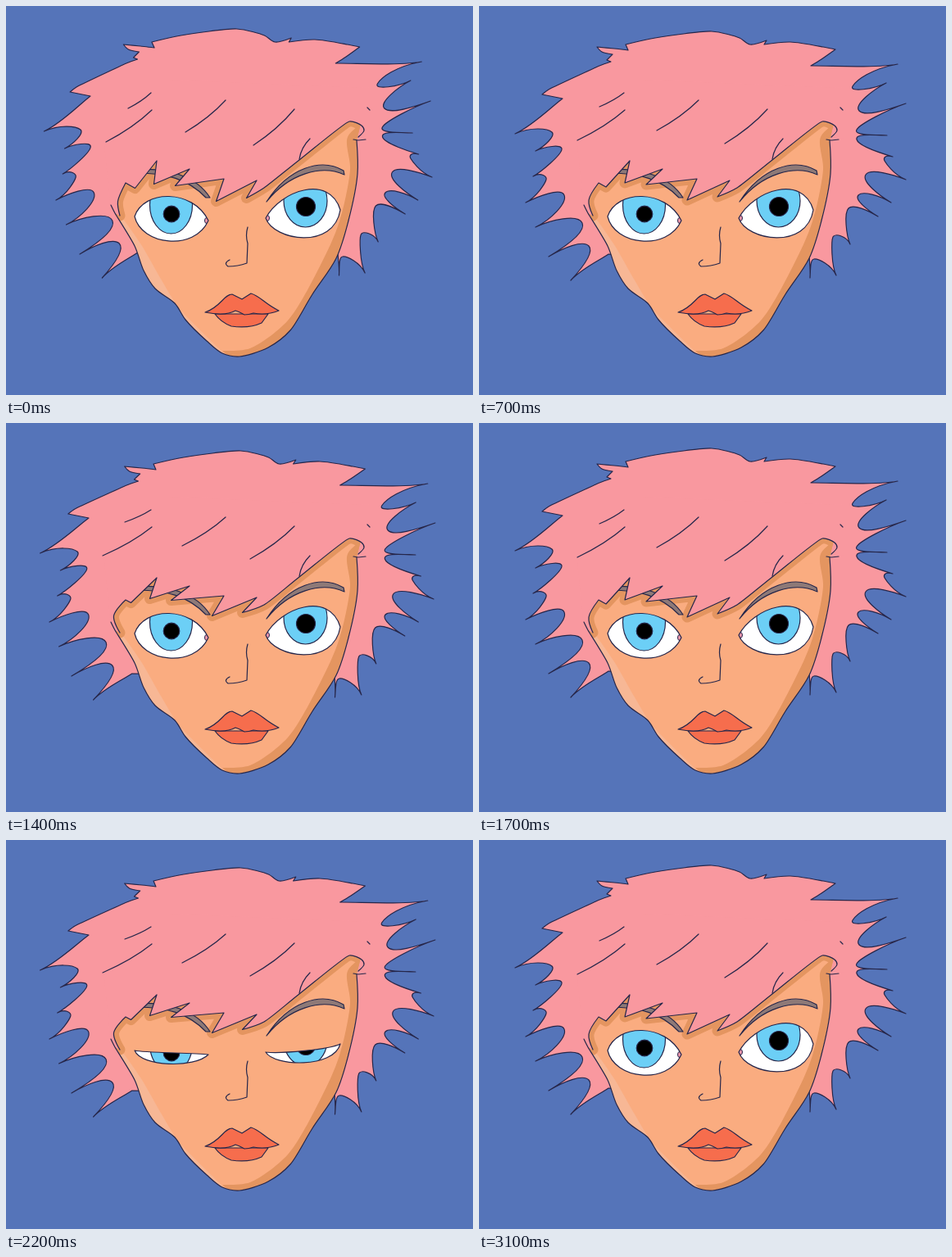
Animation, 570 px wide and 475 px high, one loop 3200 ms. Source, as an HTML page with a canvas:

```html
<!DOCTYPE html>
<html lang="en">
<head>
<meta charset="utf-8">
<title>Blinking portrait</title>
<style>
html, body { margin: 0; width: 100%; height: 100%; overflow: hidden; background: #5574b9; }
canvas { display: block; }
</style>
</head>
<body>
<canvas id="stage" width="570" height="475"></canvas>
<script>
const ctx = document.getElementById('stage').getContext('2d');
const LOOP = 3200, STEP = 100;
const INK = '#25264a', HAIR = '#f9989f', SKIN = '#faac80', SHADE = '#e49560',
  LIGHT = '#f7b795', LIPS = '#f66d4d', IRIS = '#6ccff6', BROW = '#8e7977';

const points = text => text.trim().split(/\s+/).map(p => p.split(',').map(Number));

// Hair locks alternate valley and tip, clockwise round the head
const rightLocks = points(`405,73 511,71 456,98 497,94 464,128 521,119 461,151 498,158 461,163 505,184
  495,189 521,212 472,206 503,240 463,231 487,257 451,247 453,291 432,282 436,329 409,309 404,332 403,305`);
const leftLocks = points(`158,303 112,335 134,293 85,306 126,265 69,270 104,231 57,240 82,212 66,208
  101,175 69,177 89,154 44,156 102,113`);
const crown = points(`102,113 77,108 85,102 147,73 161,68 156,66 163,59 150,56 144,50 165,52 182,54 179,47
  215,39 284,31 318,39 331,47 351,42 348,47 380,44 420,50 435,53 418,65 405,73`);
// Fringe alternates peak and tip until it sweeps up to the right
const fringeTips = points(`139,256 134,237 146,216 155,221 184,189 178,216 224,199 204,218 266,211 254,237 306,213 291,233`);
const fringeSweep = points('315,222 358,188 419,141 434,146 437,152 430,160');
const strands = ['147,123 177,106', '120,164 178,127', '217,152 268,115', '300,168 352,126'].map(points);

const jaw = points(`428,164 429,205 418,262 403,308 374,352 347,396 320,417 285,428 264,424 245,409
  219,383 206,363 182,345 168,323 157,293 133,253 128,243`);
const rightShade = points('440,140 417,160 420,200 407,263 383,318 344,384 298,418 264,421 300,440 440,330');
const leftLight = points('120,240 137,253 164,290 190,335 212,370 266,424 220,420 120,330');

const leftBrow = new Path2D('M160,200C195,197 232,207 249,234L244,234C222,211 195,204 160,204Z');
const rightBrow = new Path2D('M318,239C345,197 385,185 412,201L413,206C385,193 345,205 318,239Z');
const nose = new Path2D('M295,270Q292,280 295,290L294,314Q283,318 271,318Q265,314 273,310');
const upperLip = new Path2D(`M243,374C262,368 266,352 276,352L288,358L299,351C310,354 316,364 333,372
  Q318,378 302,375Q296,377 291,377Q284,373 280,372Q268,379 243,374Z`);
const lowerLip = new Path2D('M255,376Q262,386 275,391Q297,394 312,387L320,376Z');
const detail = new Path2D('M358,187Q360,173 371,162M441,124l3,3M424,163L430,164L439,163');

// Each lid is one cubic between the corners; its handles meet at y = shut
const eyes = [
  { from: [157, 257], to: [247, 262], shut: 272, upper: points('168,224 228,223'), lower: points('165,292 230,300'),
    iris: [201.5, 243, 26, 35], pupil: [202, 254, 9.8], duct: [245, 262] },
  { from: [317, 259], to: [408, 249], shut: 273, upper: points('335,225 395,205'), lower: points('327,287 400,298'),
    iris: [365.5, 238, 26.5, 32], pupil: [366, 245, 11.5], duct: [319, 259] }
];

const lerp = (a, b, k) => a + (b - a) * k;
const mix = (p, q, k) => [lerp(p[0], q[0], k), lerp(p[1], q[1], k)];
const gap = (p, q) => Math.hypot(q[0] - p[0], q[1] - p[1]);

// Top leans right while the lower locks swing left
const sway = (pts, s) => pts.map(([x, y]) =>
  [x + s * ((x - 285) / 105 - (y - 150) / 50), y + 3 * s]);

// Smooth run through the points that keeps sharp turns sharp
function addCurve(path, pts) {
  const at = i => pts[Math.max(0, Math.min(pts.length - 1, i))];
  const handle = i => {
    const a = at(i - 1), p = at(i), b = at(i + 1), u = gap(a, p), v = gap(p, b);
    if (!u || !v) return [0, 0];
    const [ux, uy, vx, vy] = [(p[0] - a[0]) / u, (p[1] - a[1]) / u, (b[0] - p[0]) / v, (b[1] - p[1]) / v];
    if (ux * vx + uy * vy < 0.35) return [0, 0];
    const k = Math.min(u, v) / 3 / Math.hypot(ux + vx, uy + vy);
    return [(ux + vx) * k, (uy + vy) * k];
  };
  for (let i = 0; i < pts.length - 1; i++) {
    const p = at(i), q = at(i + 1), t = handle(i), u = handle(i + 1);
    path.bezierCurveTo(p[0] + t[0], p[1] + t[1], q[0] - u[0], q[1] - u[1], ...q);
  }
}

// Round valleys, tips drawn out along the middle of each lock
function addLocks(path, pts) {
  const last = pts.length - 1;
  const valleyHandle = (i, side) => {
    const v = pts[i], a = pts[Math.max(0, i - 1)], b = pts[Math.min(last, i + 1)];
    const k = side * 0.22 * Math.min(gap(a, v) || gap(v, b), gap(v, b) || gap(a, v)) / gap(a, b);
    return [v[0] + (b[0] - a[0]) * k, v[1] + (b[1] - a[1]) * k];
  };
  for (let i = 1; i < last; i += 2) {
    const tip = pts[i], root = mix(pts[i - 1], pts[i + 1], 0.5), pull = mix(tip, root, 0.4);
    path.bezierCurveTo(...valleyHandle(i - 1, 1), ...pull, ...tip);
    path.bezierCurveTo(...pull, ...valleyHandle(i + 1, -1), ...pts[i + 1]);
  }
}

function curve(pts, closed) {
  const path = new Path2D();
  path.moveTo(...pts[0]);
  addCurve(path, pts);
  if (closed) path.closePath();
  return path;
}

function hairOutline(s) {
  const path = new Path2D(), right = sway(rightLocks, s), left = sway(leftLocks, s);
  path.moveTo(...right[0]);
  addLocks(path, right);
  path.lineTo(...left[0]);
  addLocks(path, left);
  addCurve(path, sway(crown, s));
  path.closePath();
  return path;
}

const fringePoints = s => [
  ...fringeTips.map(([x, y], i) => i % 2 ? [x - 2.5 * s, y - 1.5 * s] : [x, y]),
  ...fringeSweep
];

function paint(path, fill, line = INK, width = 1.2) {
  if (fill) { ctx.fillStyle = fill; ctx.fill(path); }
  if (line) { ctx.strokeStyle = line; ctx.lineWidth = width; ctx.stroke(path); }
}

function oval(x, y, rx, ry = rx) {
  const path = new Path2D();
  path.ellipse(x, y, rx, ry, 0, 0, Math.PI * 2);
  return path;
}

function clipped(path, draw) {
  ctx.save();
  ctx.clip(path);
  draw();
  ctx.restore();
}

function drawFace(fringe) {
  const face = curve([...jaw, [150, 170], [200, 140], [400, 110], [434, 140]], true);
  paint(face, SKIN, null);
  clipped(face, () => {
    paint(curve(leftLight, true), LIGHT, null);
    paint(curve(rightShade, true), SHADE, null);
    paint(fringe, null, SHADE, 13);
  });
  paint(leftBrow, BROW);
  paint(rightBrow, BROW);
  paint(nose);
  paint(lowerLip, LIPS);
  paint(upperLip, LIPS);
}

function drawEye({ from, to, shut, upper, lower, iris, pupil, duct }, open) {
  const [u1, u2, l1, l2] = [...upper, ...lower].map(([x, y]) => [x, lerp(shut, y, open)]);
  const shape = new Path2D();
  shape.moveTo(...from);
  shape.bezierCurveTo(...u1, ...u2, ...to);
  shape.bezierCurveTo(...l2, ...l1, ...from);
  const drop = 8 * (1 - open);
  const lowered = ([x, y, ...radii]) => oval(x, y + drop, ...radii);
  paint(shape, '#fff', null);
  clipped(shape, () => {
    paint(lowered(iris), IRIS);
    paint(lowered(pupil), '#000');
    if (open > 0.5) paint(oval(...duct, 2.5, 3.5), '#f49ab0', INK, 1);
  });
  paint(shape);
}

// One blink: quick close, slower reopening
function openness(frame) {
  const closing = (20 - frame) / 3, opening = (frame - 20) / 8;
  return Math.min(1, Math.max(closing, opening, 0.03));
}

function drawFringe(pts) {
  const cover = curve(pts);
  for (const p of points('445,162 445,100 200,90 120,170 127,243 133,253')) cover.lineTo(...p);
  paint(cover, HAIR, null);
  paint(curve(pts));
}

function drawStrand([a, b], s) {
  const x = a[0] - 2 * s, y = a[1] - 2 * s, path = new Path2D();
  path.moveTo(x, y);
  path.quadraticCurveTo(lerp(x, b[0], 0.6), lerp(y, b[1], 0.45), ...b);
  paint(path);
}

function draw(now) {
  const frame = Math.floor(now % LOOP / STEP);
  const s = -Math.round(Math.cos(frame * Math.PI / 2));
  const fringe = fringePoints(s), open = openness(frame);

  ctx.fillStyle = '#5574b9';
  ctx.fillRect(0, 0, 570, 475);
  ctx.lineJoin = ctx.lineCap = 'round';

  paint(hairOutline(s), HAIR);
  drawFace(curve(fringe));
  eyes.forEach(eye => drawEye(eye, open));
  drawFringe(fringe);
  paint(curve(jaw));
  paint(detail);
  strands.forEach(strand => drawStrand(strand, s));
}

function tick() {
  draw(performance.now());
  requestAnimationFrame(tick);
}
tick();
</script>
</body>
</html>
```
